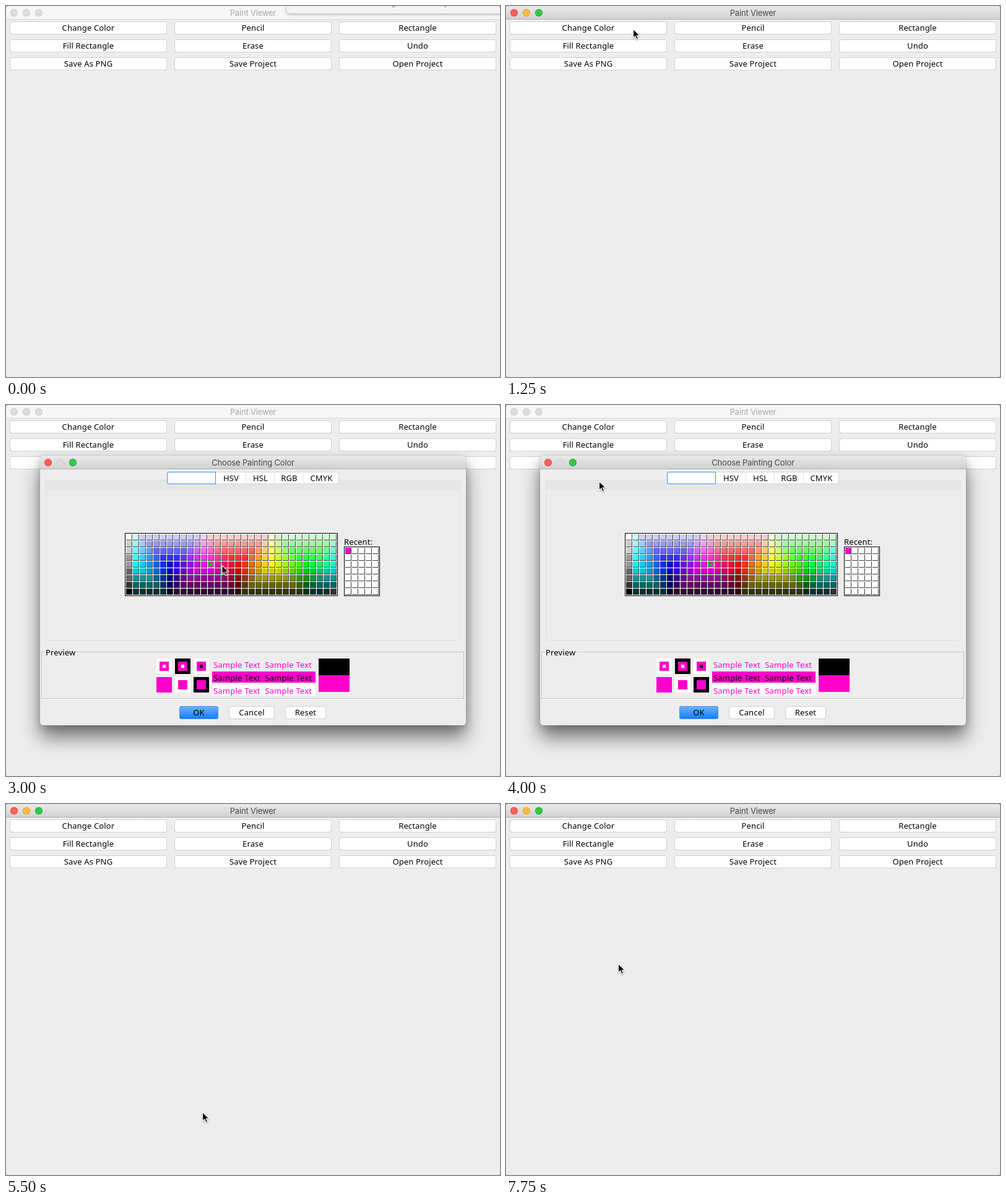
Recreate the animation shown at these times as an HTML page with a canvas. Size 798 by 600 pixels, loop 8000 ms.

```html
<!DOCTYPE html>
<html lang="en">
<head>
<meta charset="utf-8">
<title>Paint Viewer</title>
<style>
html, body { margin: 0; width: 100%; height: 100%; overflow: hidden; background: #777; }
#stage {
  position: absolute; left: 0; top: 0; width: 798px; height: 600px; overflow: hidden;
  background: #ededed; border-radius: 4px 4px 2px 2px;
  font: 13px/20px "Noto Sans", "Open Sans", sans-serif; letter-spacing: .15px; color: #000;
}
#stage * { position: absolute; box-sizing: border-box; white-space: pre; }
.bar {
  background: #f6f6f6; border-bottom: 1px solid #d9d9d9; color: #a9a9a9; text-align: center;
  font: 13px/22px Inter, Roboto, sans-serif; letter-spacing: -.17px;
}
.on { background: linear-gradient(#eae9ea, #d2d1d2); border-color: #b3b2b3; color: #484848; }
.dot { width: 12px; height: 12px; border-radius: 50%; top: 5px; background: #dcdcdc; box-shadow: inset 0 0 0 1px #cfcfcf; }
.dot.red { background: #fc605b; box-shadow: inset 0 0 0 1px #e2504c; }
.dot.amber { background: #fdbc40; box-shadow: inset 0 0 0 1px #e0a236; }
.dot.green { background: #34c84a; box-shadow: inset 0 0 0 1px #2bac3c; }

.btn { background: #fff; border-radius: 4px; box-shadow: inset 0 0 0 1px #d2d2d2, inset 0 -1px #b5b5b5; text-align: center; }
.btn span { inset: 0; }
.blue { background: linear-gradient(#6eb5fb, #0f7bfb); box-shadow: inset 0 0 0 1px #3f8fee; }
.btn::before, .btn::after { content: ""; inset: 0; border-radius: 4px; opacity: 0; }
.btn::before { background: linear-gradient(#4c99fc, #0a5ce2); box-shadow: inset 0 0 0 1px #5d9ff0; }
.btn::after { box-shadow: inset 0 0 0 1.5px #7fb2ea, 0 0 1px #a9cdf4; }

.peek { background: #f4f4f4; border-radius: 0 0 0 6px; box-shadow: 0 1px 5px rgba(0,0,0,.35); color: #888; overflow: hidden; }
.dialog {
  background: #ededed; border-radius: 5px;
  box-shadow: 0 0 1px rgba(0,0,0,.5), 0 20px 30px rgba(0,0,0,.5), 0 4px 14px rgba(0,0,0,.16);
}
.dialog .bar { border-radius: 5px 5px 0 0; }
.pane { border: 1px solid #e1e1e1; border-radius: 3px; background: linear-gradient(#e6e6e6 15px, #ececec 15px); }
.tab { background: #fff; text-align: center; border-right: 1px solid #e2e2e2; }
.tab.blue { color: #fff; border-radius: 4px 0 0 4px; border: 0; }
.group { border: 1px solid #bdbdbd; box-shadow: inset 1px 1px #f8f8f8, 1px 1px #f8f8f8; }
.mid { text-align: center; }
.legend { background: #ededed; }
.sample { letter-spacing: .22px; }
.pick { background: var(--c); }
.ink { color: var(--c); }
.white { background: #fff; }
.black { background: #000; }
.mark { width: 10px; height: 10px; fill: none; }
#cursor { left: -1px; top: -1px; width: 16px; height: 22px; overflow: visible; filter: drop-shadow(0 1px 1px rgba(0,0,0,.35)); }

.peek { animation: peek 8s step-end infinite; }
.main-on { animation: active 8s step-end infinite; }
.dialog { --c: #000; animation: dialog 8s step-end infinite, pick 8s step-end infinite; }
.picked { animation: picked 8s step-end infinite; }
.unpicked { animation: unpicked 8s step-end infinite; }
.color::before { animation: press-color 8s step-end infinite; }
.color::after { animation: focus-color 8s step-end infinite; }
.pencil::before { animation: press-pencil 8s step-end infinite; }
.pencil::after { animation: focus-pencil 8s step-end infinite; }
#cursor { animation: move 8s infinite; }

@keyframes peek { 0% { opacity: 1 } 3.125%, 100% { opacity: 0 } }
@keyframes active { 0% { opacity: 0 } 9.375% { opacity: 1 } 18.75% { opacity: 0 } 68.75%, 100% { opacity: 1 } }
@keyframes dialog { 0% { opacity: 0 } 18.75% { opacity: 1 } 68.75%, 100% { opacity: 0 } }
@keyframes pick { 0% { --c: #000 } 31.25%, 100% { --c: #f0c } }
@keyframes picked { 0% { opacity: 0 } 31.25%, 100% { opacity: 1 } }
@keyframes unpicked { 0% { opacity: 1 } 31.25%, 100% { opacity: 0 } }
@keyframes press-color { 0% { opacity: 0 } 12.5% { opacity: 1 } 15.625%, 100% { opacity: 0 } }
@keyframes focus-color {
  0% { opacity: 0 } 12.5% { opacity: 1 } 18.75% { opacity: 0 }
  68.75% { opacity: 1 } 81.25%, 100% { opacity: 0 }
}
@keyframes press-pencil { 0% { opacity: 0 } 81.25% { opacity: 1 } 84.375%, 100% { opacity: 0 } }
@keyframes focus-pencil { 0% { opacity: 0 } 81.25%, 100% { opacity: 1 } }

/* The pointer is sampled every 250 ms, so each leg has one step per sample. */
@keyframes move {
  0% { transform: translate(470px, -40px); animation-timing-function: step-end }
  6.25% { transform: translate(400px, 8px); animation-timing-function: steps(2) }
  12.5% { transform: translate(206px, 38px); animation-timing-function: steps(2) }
  18.75% { transform: translate(206px, 38px); animation-timing-function: steps(3) }
  28.125% { transform: translate(322px, 264px); animation-timing-function: step-end }
  31.25% { transform: translate(331px, 257px); animation-timing-function: step-end }
  34.375% { transform: translate(331px, 257px); animation-timing-function: steps(2) }
  40.625% { transform: translate(368px, 263px); animation-timing-function: steps(3) }
  50% { transform: translate(151px, 124px); animation-timing-function: steps(3) }
  59.375% { transform: translate(616px, 523px); animation-timing-function: steps(2) }
  65.625% { transform: translate(318px, 499px); animation-timing-function: step-end }
  68.75% { transform: translate(318px, 499px); animation-timing-function: steps(3) }
  78.125% { transform: translate(472px, 34px); animation-timing-function: steps(2) }
  84.375% { transform: translate(472px, 34px); animation-timing-function: steps(4) }
  96.875%, 100% { transform: translate(182px, 259px); animation-timing-function: step-end }
}
</style>
</head>
<body>
<div id="stage"></div>
<script>
const stage = document.getElementById('stage');

function add(parent, cls, x, y, w, h, text = '', tag = 'div') {
  const el = document.createElement(tag);
  el.className = cls;
  el.style.left = x + 'px';
  el.style.top = y + 'px';
  if (w) el.style.width = w + 'px';
  if (h) el.style.height = h + 'px';
  el.textContent = text;
  parent.append(el);
  return el;
}

function bar(parent, cls, w, title, dots) {
  const el = add(parent, 'bar ' + cls, 0, 0, w, 22, title);
  dots.forEach((d, i) => {
    const dot = add(el, 'dot ' + d, 7 + 20 * i, 5);
    dot.style.top = '5px';
  });
}

function button(parent, cls, x, y, w, label) {
  const el = add(parent, 'btn ' + cls, x, y, w, 21);
  add(el, '', 0, 0, w, 20, label, 'span');
}

function addSvg(parent, html) {
  parent.insertAdjacentHTML('beforeend', html);
}

// Main window
bar(stage, '', 798, 'Paint Viewer', ['', '', '']);
bar(stage, 'on main-on', 798, 'Paint Viewer', ['red', 'amber', 'green']);
['Change Color', 'Pencil', 'Rectangle', 'Fill Rectangle', 'Erase', 'Undo',
  'Save As PNG', 'Save Project', 'Open Project'].forEach((label, i) => {
  button(stage, ['color', 'pencil'][i] || '', 6 + 266 * (i % 3), 25 + 29 * Math.floor(i / 3), 254, label);
});

const peek = add(stage, 'peek', 453, 0, 350, 12);
add(peek, '', 169, -16, 0, 0, 'g');
add(peek, '', 255, -16, 0, 0, 'y');

// Colour dialog; children use stage coordinates through the offset layer
const dialog = add(stage, 'dialog', 55, 82, 688, 436);
bar(dialog, 'on', 688, 'Choose Painting Color', ['red', '', 'green']);
const layer = add(dialog, '', -55, -82);
add(layer, 'pane', 64, 121, 671, 260);

const tabs = add(layer, 'btn', 260, 108, 278, 20);
[['Swatches', 0, 79], ['HSV', 79, 49], ['HSL', 128, 46], ['RGB', 174, 47], ['CMYK', 221, 57]]
  .forEach(([label, x, w], i) => {
    const tab = add(tabs, i ? 'mid' : 'tab blue', x, 0, w, 20, label);
    if (i && i < 4) add(tab, '', w - 1, 2, 1, 16).style.background = '#e2e2e2';
  });

// Thirty hues from cyan round to green; rows are tints, then shades
function swatch(col, row) {
  if (!col) return Array(3).fill([255, 204, 204, 153, 153, 102, 102, 51, 0][row]);
  if (col === 30 && row === 8) return [51, 51, 51];
  return [15, 25, 5].map(peak => {
    const d = Math.abs(col - 1 - peak);
    const v = 51 * Math.max(0, Math.min(5, 10 - Math.min(d, 30 - d)));
    return row < 5 ? Math.max(v, 204 - 51 * row) : Math.min(v, 459 - 51 * row);
  });
}

function grid(x, y, cols, rows, color) {
  const w = cols * 11 + 3, h = rows * 11 + 3;
  const cv = add(layer, '', x, y, w, h, '', 'canvas');
  cv.width = w;
  cv.height = h;
  const g = cv.getContext('2d');
  const rect = (c, ...r) => { g.fillStyle = c; g.fillRect(...r); };
  rect('#000', 0, 0, w, h);
  rect('#fff', 1, 1, w - 2, h - 2);
  for (let r = 0; r < rows; r++) {
    for (let c = 0; c < cols; c++) {
      const px = 2 + c * 11, py = 2 + r * 11;
      rect('#3c3c3c', px, py, 10, 10);
      rect(`rgb(${color(c, r)})`, px, py, 9, 9);
    }
  }
}

function mark(cls, x, y, color) {
  addSvg(layer, `<svg class="mark ${cls}" style="left:${x}px;top:${y}px;stroke:${color}">
    <path d="M.5 .5h9v9h-9zl9 9m0-9l-9 9"/></svg>`);
}

grid(192, 207, 31, 9, swatch);
mark('unpicked', 194, 209, '#000');
mark('picked', 326, 253, '#0f0');
add(layer, '', 546, 211, 0, 0, 'Recent:');
grid(546, 229, 5, 7, () => [255, 255, 255]);
add(layer, 'picked', 548, 231, 9, 9).style.background = '#f0c';

// Preview
add(layer, 'group', 57, 399, 683, 76);
add(layer, 'legend', 62, 390, 51, 20, '');
add(layer, '', 64, 390, 0, 0, 'Preview');
[['white', 'pick', 'white'], ['black', 'pick', 'white'], ['white', 'pick', 'black'],
  ['pick'], ['white', 'pick'], ['black', 'pick']].forEach((rings, i) => {
  const x = 243 + 30 * (i % 3), y = i < 3 ? 410 : 440;
  rings.forEach((c, k) => add(layer, c, x + 5 * k, y + 5 * k, 25 - 10 * k, 25 - 10 * k));
});
add(layer, 'pick', 333, 431, 167, 18);
add(layer, 'white', 333, 452, 167, 18);
['ink', '', 'ink'].forEach((c, i) =>
  add(layer, 'sample ' + c, 335, 410 + 21 * i, 0, 0, 'Sample Text  Sample Text'));
add(layer, 'black', 505, 410, 50, 27);
add(layer, 'pick', 505, 437, 50, 27);

button(layer, 'blue', 280, 487, 63, 'OK');
button(layer, '', 360, 487, 74, 'Cancel');
button(layer, '', 451, 487, 66, 'Reset');

addSvg(stage, `<svg id="cursor"><path d="M.5 .5V14.6L3.8 11.6 6.1 17 8.6 15.9 6.3 10.7H10.9Z"
  fill="#000" stroke="#fff" stroke-width="1.1"/></svg>`);
</script>
</body>
</html>
```
